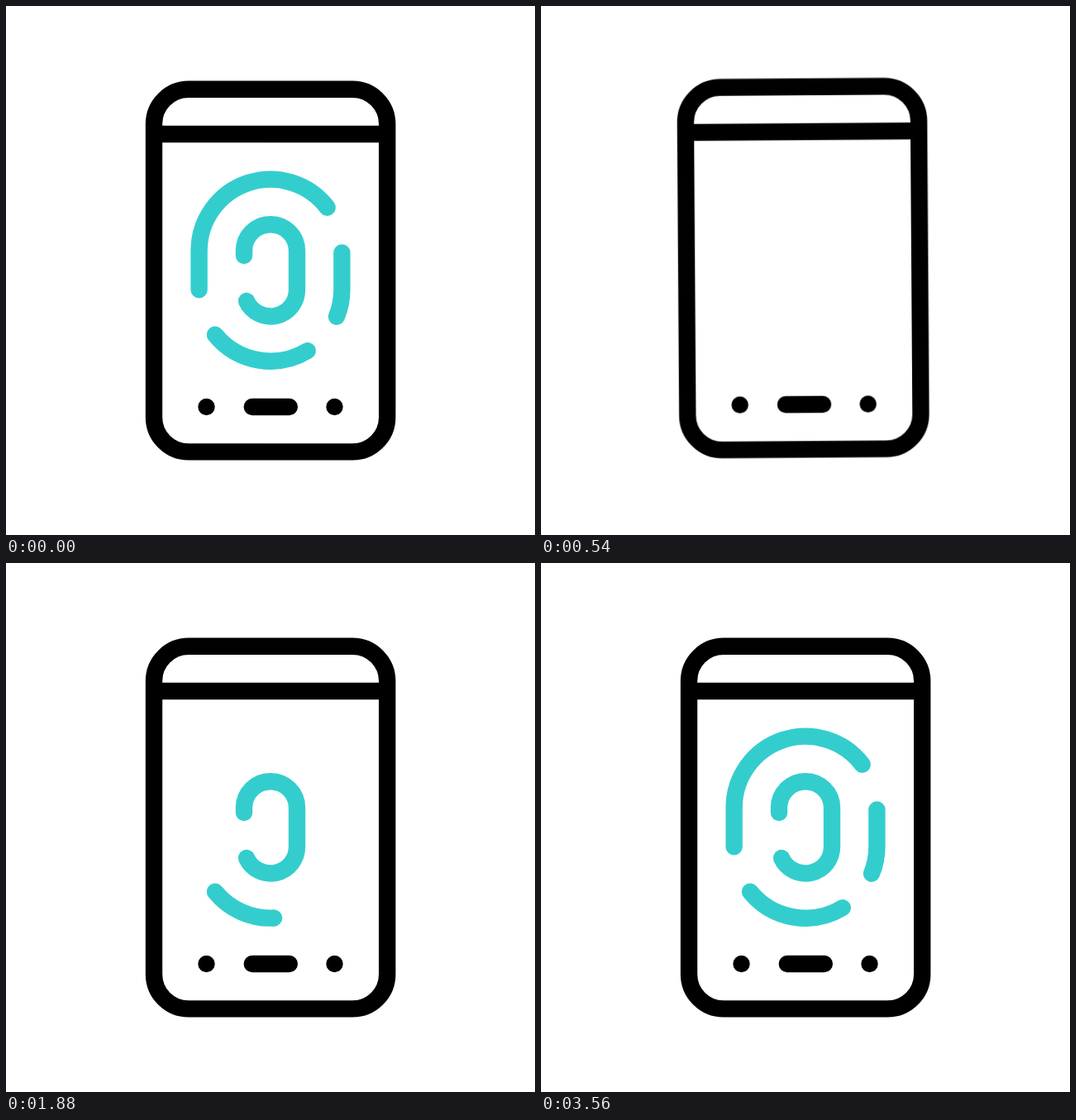
Animation, 640 px wide and 640 px high, one loop 3.6 s. Source, as an HTML page:

```html
<!DOCTYPE html>
<html lang="en">
<head>
<meta charset="utf-8">
<title>Fingerprint unlock</title>
<style>
  html, body { margin: 0; width: 100%; height: 100%; overflow: hidden; background: #fff; }
  svg { display: block; width: 100vw; height: 100vh; }

  .phone {
    fill: none;
    stroke: #000;
    stroke-width: 20.4;
    stroke-linecap: round;
    transform-origin: 320px 320px;
    animation: shake 3600ms infinite ease-in-out;
  }
  @keyframes shake {
    0%      { transform: translate(0, 0) rotate(0deg); }
    2.1%    { transform: translate(20px, 24px) rotate(3.5deg); }
    4.444%  { transform: translate(-15.9px, 14px) rotate(1.03deg); }
    8.611%  { transform: translate(-30px, -30px) rotate(-4deg);
              animation-timing-function: cubic-bezier(.5, 0, 0, 1); }
    19.86%, 100% { transform: translate(0, 0) rotate(0deg); }
  }

  /* Each ridge is erased from its start, hidden, then drawn again in turn. */
  .ridge {
    stroke: #34cdcd;
    stroke-dasharray: 1 3;
    animation: 3600ms infinite cubic-bezier(.5, 0, 0, 1);
  }
  .inner  { animation-name: inner; }
  .bottom { animation-name: bottom; }
  .right  { animation-name: right; }
  .top    { animation-name: top; }

  @keyframes inner {
    0% { stroke-dashoffset: 0; }
    8.556% { stroke-dashoffset: -1; }
    8.56%, 27.8% { stroke-dashoffset: 1.5; }
    27.806% { stroke-dashoffset: 1; }
    48.917%, 100% { stroke-dashoffset: 0; }
  }
  @keyframes bottom {
    0% { stroke-dashoffset: 0; }
    8.556% { stroke-dashoffset: -1; }
    8.56%, 44.6% { stroke-dashoffset: 1.5; }
    44.611% { stroke-dashoffset: 1; }
    65.722%, 100% { stroke-dashoffset: 0; }
  }
  @keyframes right {
    0% { stroke-dashoffset: 0; }
    8.556% { stroke-dashoffset: -1; }
    8.56%, 61.05% { stroke-dashoffset: 1.5; }
    61.056% { stroke-dashoffset: 1; }
    82.167%, 100% { stroke-dashoffset: 0; }
  }
  @keyframes top {
    0% { stroke-dashoffset: 0; }
    8.556% { stroke-dashoffset: -1; }
    8.56%, 77.49% { stroke-dashoffset: 1.5; }
    77.5% { stroke-dashoffset: 1; }
    98.611%, 100% { stroke-dashoffset: 0; }
  }
</style>
</head>
<body>
<svg viewBox="0 0 640 640">
  <g class="phone">
    <rect x="179" y="100.8" width="282.2" height="438.6" rx="42"/>
    <path d="M179 155H461" stroke-linecap="butt"/>
    <path d="M242.5 485h.01M297.8 485H342.8M397.5 485h.01"/>
    <path class="ridge inner" pathLength="1" d="M291 357A32 32 0 0 0 352 343.2V296.2A32 32 0 0 0 288 296.2V302"/>
    <path class="ridge bottom" pathLength="1" d="M253 397.7A86.4 86.4 0 0 0 364.8 417.1"/>
    <path class="ridge right" pathLength="1" d="M400 375.7A86.4 86.4 0 0 0 406.4 343.2V298.5"/>
    <path class="ridge top" pathLength="1" d="M388.7 243.7A86.4 86.4 0 0 0 233.6 296.2V343.2"/>
  </g>
</svg>
</body>
</html>
```
